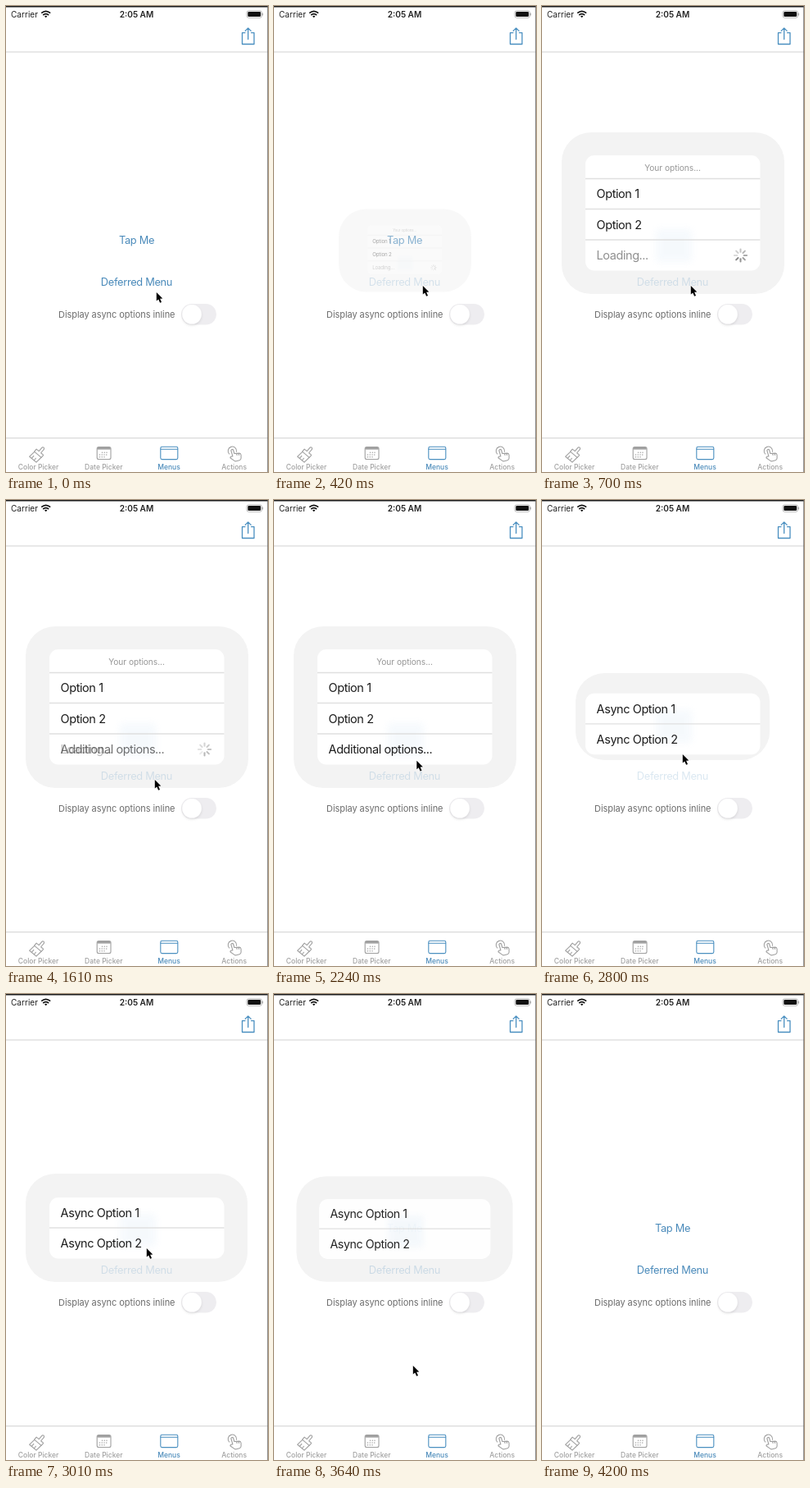
An HTML page for the animation above (4.27 s loop, 320x568 px).

```html
<!DOCTYPE html>
<html lang="en">
<head>
<meta charset="utf-8">
<title>Deferred menu</title>
<style>
  html, body { margin: 0; width: 100%; height: 100%; overflow: hidden; background: #fff; }
  svg { display: block; width: 320px; height: 568px; }
  text { font-family: Inter, Roboto, sans-serif; }
  .mid { text-anchor: middle; }
  .button { font-size: 12.8px; letter-spacing: -.3px; fill: #4a8aba; }
  .row { font-size: 14.5px; letter-spacing: -.43px; fill: #1c1c1c; }
  .header { font-size: 10.2px; letter-spacing: -.06px; fill: #969696; }
  .label { font-size: 11px; letter-spacing: -.06px; fill: #6c6c6c; }
  .tab { font-size: 8.5px; font-weight: 500; fill: #a0a0a0; }
  .status { font-size: 10.1px; fill: #222; }
  .icon { fill: none; stroke: #a0a0a0; stroke-width: 1.1; stroke-linecap: round; stroke-linejoin: round; }
  .blue { stroke: #4a8fc0; }
  .rule { stroke: #e0e0e0; stroke-width: 1.3; }
  .card { fill: #fff; }
  .glow { fill: #e8f2fa; opacity: .4; }
</style>
</head>
<body>
<svg viewBox="0 0 320 568">
  <defs>
    <filter id="soft" x="-50%" y="-50%" width="200%" height="200%"><feGaussianBlur stdDeviation="4"/></filter>
    <filter id="drop" x="-30%" y="-30%" width="160%" height="170%">
      <feDropShadow dx="0" dy="1.5" stdDeviation="1.5" flood-opacity=".12"/>
    </filter>
  </defs>
  <rect width="320" height="568" fill="#fff"/>

  <!-- status and navigation bars -->
  <text class="status" x="6" y="14">Carrier</text>
  <g fill="none" stroke="#111" stroke-width="1.7">
    <path d="M43.2 8.6q5.5-4.6 11 0M45.2 11q3.5-2.9 7 0"/>
    <path d="M47 12.5q1.7-1.4 3.4 0l-1.7 1.8z" fill="#111" stroke="none"/>
  </g>
  <text class="status mid" x="159.5" y="14" font-weight="600">2:05 AM</text>
  <rect x="294" y="5.8" width="18.5" height="8.6" rx="2.5" fill="none" stroke="#aaa" stroke-width=".8"/>
  <rect x="295.3" y="7.1" width="15.9" height="6" rx="1.4" fill="#111"/>
  <path d="M313.6 8.7v2.8" stroke="#aaa"/>
  <path class="icon blue" style="stroke-width:1.3" d="M292 32.6h-3.5v13.9h14.5v-13.9h-3.5M295.7 40.5V27.2M292.2 30.4l3.5-3.5 3.5 3.5"/>
  <path d="M0 56h320" stroke="#d2d2d2"/>

  <!-- page -->
  <text class="label" x="64" y="380">Display async options inline</text>
  <rect x="214" y="363" width="43" height="25.6" rx="12.8" fill="#eeedf0"/>
  <circle cx="227" cy="375.8" r="11.8" fill="#fff" filter="url(#drop)"/>

  <rect id="halo" fill="#f3f3f3"/>
  <text class="button mid" id="deferred" x="159.5" y="341">Deferred Menu</text>
  <g id="first">
    <rect class="card" x="53" y="182" width="213.5" height="140.5" rx="11"/>
    <rect class="glow" x="139" y="272" width="44" height="40" filter="url(#soft)"/>
    <path class="rule" d="M53 210.5h213.5M53 247.5h213.5M53 285h213.5"/>
    <text class="header mid" x="159.5" y="201">Your options...</text>
    <text class="row" x="66.6" y="234.3">Option 1</text>
    <text class="row" x="66.6" y="271.8">Option 2</text>
    <g id="loading">
      <text class="row" x="66.6" y="309.2" style="fill:#8f8f8f">Loading...</text>
      <g id="spinner" transform="translate(242.5 304)"></g>
    </g>
    <text class="row" id="additional" x="66.6" y="309.2">Additional options...</text>
  </g>
  <text class="button mid" id="tap" x="159.5" y="290">Tap Me</text>
  <g id="second">
    <rect class="card" x="53" y="248" width="213.5" height="74.5" rx="11"/>
    <rect class="glow" x="139" y="268" width="44" height="40" filter="url(#soft)"/>
    <path class="rule" d="M53 285h213.5"/>
    <text class="row" x="66.6" y="272">Async Option 1</text>
    <text class="row" x="66.6" y="309.2">Async Option 2</text>
  </g>

  <!-- tab bar -->
  <rect y="527" width="320" height="41" fill="#fff"/>
  <path d="M0 526.7h320" stroke="#d0d0d0"/>
  <g class="icon">
    <g transform="translate(39.5 546) rotate(40)">
      <path d="M-1.6-3v-6q1.6-2.4 3.2 0v6h4v4h-11.2v-4zM-5.4 1l-.8 8.4H4.6l.8-8.4M-2.8 9V5.5M1 9V6"/>
    </g>
    <rect x="111.2" y="537.5" width="16.8" height="15" rx="2"/>
    <path d="M111.5 539.3h16.2" stroke-width="2.6" stroke-linecap="butt"/>
    <path d="M117.5 544.3h8M114.5 547h11M114.5 549.8h8" stroke-width="1.5" stroke-dasharray="0 2.75"/>
    <g class="blue">
      <rect x="188.8" y="537.2" width="21" height="15.4" rx="1.8"/>
      <path d="M189 540.2h20.6"/>
    </g>
    <path transform="rotate(-16 279 546)" d="M276.2 548.2v-7.4q1.4-2 2.8 0v4.7l6 1.3q1.7.6 1.4 2.6l-1 3.7q-.7 2-2.6 2h-4q-1.4 0-2.4-1.4l-3.6-4.6q.7-2 3.4-.9zM281.6 546.2v2M284 546.8v2M273 544.3a5.2 5.2 0 1 1 9.2-.3"/>
  </g>
  <g id="tabs"></g>

  <path d="M0 .7h320" stroke="#1c1c1c" stroke-width="1.4"/>
  <path d="M319.6 0v568" stroke="#666" stroke-width=".8"/>
  <path id="cursor" d="M0 0v10.6l2.4-2.2 1.9 4.3 1.9-.8-1.9-4.2 3.2-.2z" stroke="#fff" stroke-width=".6" paint-order="stroke"/>
</svg>
<script>
const LOOP = 4270, TICK = 70, MORPH = 350;
const OPEN = 350, LOADED = 1470, SWITCH = 2380, CLOSE = 3570;
const $ = id => document.getElementById(id);

const progress = (t, from, length = MORPH) => Math.min(1, Math.max(0, (t - from) / length));
const easeIn = k => k * k;
const easeOut = k => 1 - (1 - k) ** 2;
const smooth = k => k * k * (3 - 2 * k);
const mix = (a, b, k) => a + (b - a) * k;
const fade = (id, value) => $(id).setAttribute('opacity', value);

const moves = [
  { at: 0, length: 280, dx: -2, dy: -8 },
  { at: 2030, length: 280, dx: -10, dy: -31 },
  { at: 3080, length: 280, dx: -2, dy: 143 },
  { at: 3850, length: 350, dx: -4, dy: 131 }
];

// Edges as left, top, right, bottom.
const halos = {
  closed: [110, 300, 210, 347],
  first: [24, 154, 296, 351],
  second: [24, 219, 295, 351],
  pinch: [24, 3, -24, -48]
};

function placeCursor(t) {
  let x = 183.8, y = 349;
  for (const { at, length, dx, dy } of moves) {
    const k = progress(t, at, length);
    x += dx * k;
    y += dy * k;
  }
  $('cursor').setAttribute('transform', `translate(${x} ${y})`);
}

function placeMenu(id, centre, shift, scale, opacity) {
  $(id).setAttribute('transform',
    `translate(159.75 ${centre + shift}) scale(${scale}) translate(-159.75 ${-centre})`);
  fade(id, opacity);
}

function placeHalo(fall, shown) {
  const pinch = Math.sin(Math.PI * fall);
  const [left, top, right, bottom] = halos.closed.map((edge, i) => {
    const full = mix(halos.first[i], halos.second[i], smooth(fall)) + halos.pinch[i] * pinch;
    return mix(edge, full, shown);
  });
  const box = { x: left, y: top, width: right - left, height: bottom - top,
    rx: Math.min(36, (bottom - top) / 3), opacity: Math.min(1, shown * 1.5) };
  for (const key in box) $('halo').setAttribute(key, box[key]);
}

$('spinner').innerHTML = Array.from({ length: 8 }, (_, i) =>
  `<path d="M0-4.2V-7.6" stroke="#888" stroke-width="2" stroke-linecap="round" transform="rotate(${i * 45})"/>`).join('');
const spokes = [...$('spinner').children];

$('tabs').innerHTML = ['Color Picker', 'Date Picker', 'Menus', 'Actions'].map((name, i) =>
  `<text class="tab mid" x="${39.6 + i * 79.7}" y="565.4"${i === 2 ? ' style="fill:#4a8aba"' : ''}>${name}</text>`).join('');

function draw(t) {
  const open = easeOut(progress(t, OPEN));
  const leave = progress(t, SWITCH);
  const grow = easeOut(leave);
  const fall = progress(t, SWITCH, 560);
  const close = easeIn(progress(t, CLOSE));
  const loaded = progress(t, LOADED);

  placeHalo(fall, open * (1 - close));
  placeMenu('first', 252.2, 70 * (1 - open) + 20 * leave, mix(.1, 1, open) - .67 * leave, open * (1 - leave) ** 1.5);
  placeMenu('second', 285.2, -78 * (1 - smooth(fall)) + 30 * close, mix(.36, 1, grow) - .5 * close, grow * (1 - close));
  fade('tap', Math.max(1 - open, grow));
  fade('deferred', 1 - .8 * (progress(t, 140, 210) - close));
  fade('loading', 1 - loaded);
  fade('additional', easeOut(loaded));
  const head = Math.floor(t / 125);
  spokes.forEach((spoke, i) => spoke.setAttribute('opacity', 1 - ((head - i) % 8 + 8) % 8 * .1));
  placeCursor(t);
}

const start = performance.now();
function frame() {
  const t = (performance.now() - start) % LOOP;
  draw(Math.floor(t / TICK) * TICK);
  requestAnimationFrame(frame);
}
frame();
</script>
</body>
</html>
```
